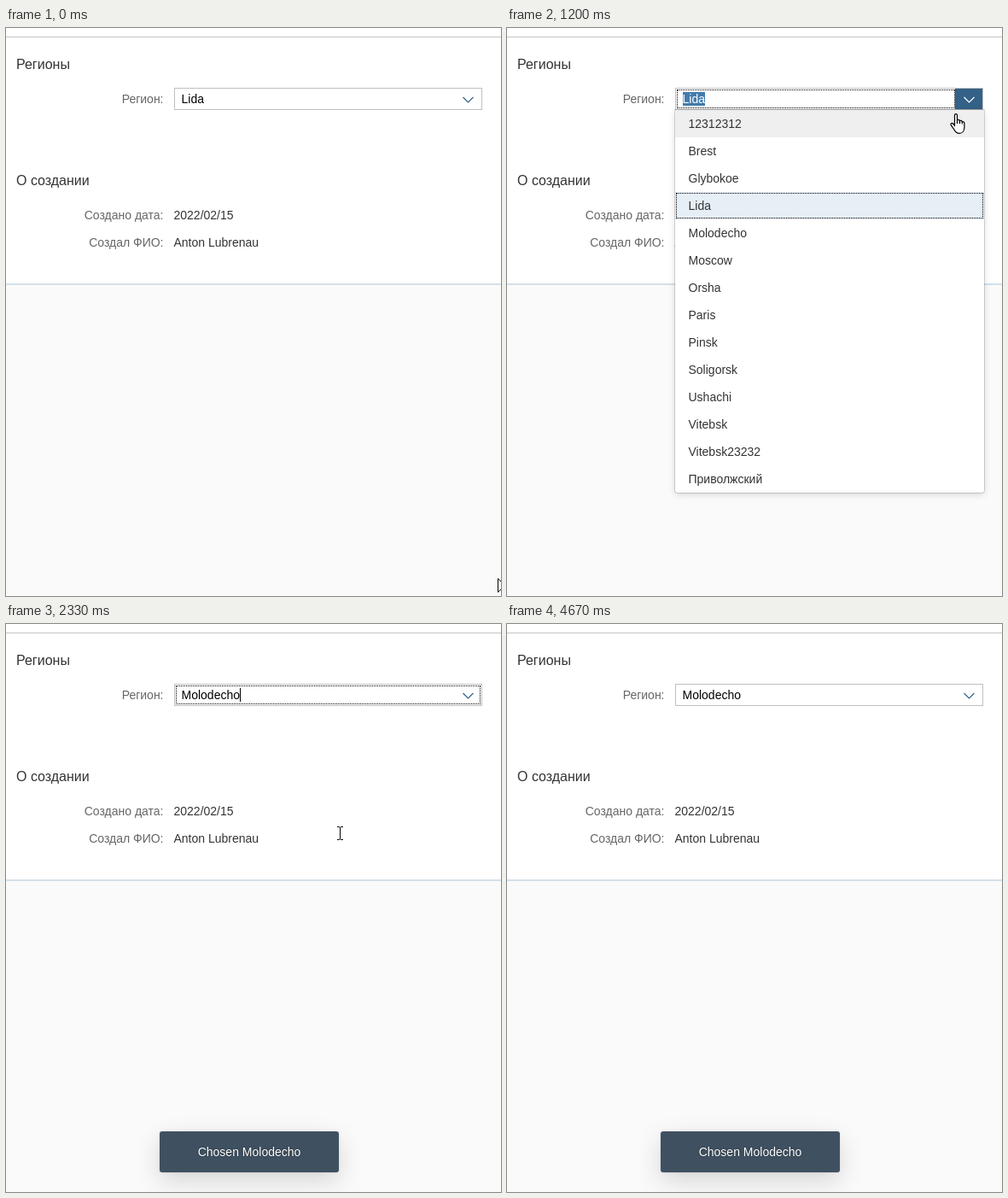
These frames come from a looping animation (580x665 px, 4740 ms). An HTML page:

```html
<!DOCTYPE html>
<html lang="ru">
<head>
<meta charset="utf-8">
<title>Регионы</title>
<style>
html, body { margin: 0; width: 100%; height: 100%; overflow: hidden; }
body { position: relative; background: #fafafa; color: #333; font: 14px/26px "Liberation Sans", Arial, sans-serif; }
div, svg { position: absolute; box-sizing: border-box; white-space: nowrap; }
svg { overflow: visible; }
#panel { left: 0; top: 0; width: 580px; height: 301px; background: #fff; border-bottom: 2px solid #d3e0ea; }
#rule { left: 0; top: 10px; width: 580px; height: 1px; background: #c4c4c4; }
.title { left: 12px; font-size: 16px; line-height: 20px; }
.label { right: 395.5px; color: #666; }
.value { left: 196.5px; }
#field { left: 197px; top: 70px; width: 361px; height: 26px; border: 1px solid #bfbfbf; background: #fff; }
#focus { left: 199px; top: 72px; height: 22px; border: 1px dotted #000; }
#text { left: 205.5px; top: 70px; color: #000; }
#text.marked span { background: #427cac; color: #fff; }
#caret { left: 274px; top: 75px; width: 1px; height: 16px; background: #000; }
#button { left: 525px; top: 71px; width: 32px; height: 24px; }
#chevron { left: 535px; top: 80px; fill: none; stroke-width: 1.2; }
#list { left: 197px; top: 96px; width: 362px; height: 448px; background: #fff; border-radius: 0 0 3px 3px;
  box-shadow: 0 0 0 1px rgba(0,0,0,.15), 0 2px 8px rgba(0,0,0,.15); }
.row { left: 0; width: 362px; height: 32px; padding-left: 15.5px; line-height: 32px; }
.row.hover { background: #efefef; }
.row.current { background: #e6eef6; }
.row.chosen { background: #427cac; color: #fff; text-shadow: 0 0 2px rgba(0,0,0,.5); }
.row.current::after, .row.chosen::after { content: ""; position: absolute; inset: 1px; border: 1px dotted #000; }
#toast { left: 180px; top: 594px; width: 210px; height: 48px; border-radius: 3px; background: #3f5161; color: #fff;
  line-height: 48px; text-align: center; text-shadow: 0 0 2px rgba(0,0,0,.5); box-shadow: 0 10px 30px rgba(0,0,0,.15), 0 0 3px rgba(0,0,0,.1); }
.cursor { left: 0; top: 0; fill: #fff; stroke: #000; stroke-width: 1; }
</style>
</head>
<body>
<div id="panel"></div>
<div id="rule"></div>
<div class="title" style="top:33px">Регионы</div>
<div class="label" style="top:70px">Регион:</div>
<div class="title" style="top:169px">О создании</div>
<div class="label" style="top:206px">Создано дата:</div>
<div class="value" style="top:206px">2022/02/15</div>
<div class="label" style="top:238px">Создал ФИО:</div>
<div class="value" style="top:238px">Anton Lubrenau</div>

<div id="field"></div>
<div id="focus"></div>
<div id="text"><span></span></div>
<div id="caret"></div>
<div id="button"></div>
<svg id="chevron" width="13" height="8"><path d="M.5 1 6.5 7 12.5 1"/></svg>
<div id="list"></div>
<div id="toast">Chosen Molodecho</div>

<svg class="cursor" id="arrow" width="12" height="19"><path d="M.5 .5V16.5L4.2 13 6.9 18.6 9 17.6 6.5 12H11.5Z"/></svg>
<svg class="cursor" id="beam" width="7" height="16" style="fill:none"><path d="M0 .5H3M4 .5H7M3.5 1V15M0 15.5H3M4 15.5H7"/></svg>
<svg class="cursor" id="hand" width="18" height="24" style="stroke-width:1.2">
  <path d="M5.5 2Q5.6 .6 7 .6T8.5 2V8Q10-.2 11.5 8.6 13.5 7.4 14.3 9.6 16.5 9 16.9 11.2V16.5C16.9 20.5 14.5 23.4 11 23.4 7.5 23.4 6.2 21.5 5 19L1.2 13.6C.4 11.6 2.2 10.6 3.6 12L5.5 14.2Z"
    visibility="hidden"/>
  <path d="M5.5 2Q5.6 .6 7 .6T8.5 2V7.8Q10.5 6.9 11.5 8.6 13.5 7.6 14.3 9.6 16.5 9.2 16.9 11.2V16.5C16.9 20.5 14.5 23.4 11 23.4 7.5 23.4 6.2 21.5 5 19L1.2 13.6C.4 11.6 2.2 10.6 3.6 12L5.5 14.2Z"/>
  <path d="M8.5 7.8V12M11.5 8.6V12M14.3 9.6V12.5" fill="none"/>
</svg>

<script>
const LOOP = 4740, TICK = 1000 / 15;
const $ = id => document.getElementById(id);
const names = ["12312312", "Brest", "Glybokoe", "Lida", "Molodecho", "Moscow", "Orsha", "Paris",
  "Pinsk", "Soligorsk", "Ushachi", "Vitebsk", "Vitebsk23232", "Приволжский"];
const LIDA = 3, PICK = 4;

const rows = names.map((name, i) => {
  const row = document.createElement("div");
  row.className = "row";
  row.style.top = i * 32 + "px";
  row.textContent = name;
  return $("list").appendChild(row);
});

// Pointer path: tick, x, y of the hot spot
const path = [
  [0, 576, 644], [1, 560, 600], [3, 505, 430], [5, 470, 270], [6, 463, 200], [8, 490, 102],
  [9, 520, 90], [10, 547, 88], [16, 547, 88], [18, 525, 100], [21, 452, 156], [26, 389, 244],
  [34, 389, 244], [35, 391, 245], [48, 391, 245], [52, 377, 256], [55, 361, 272],
  [57, 335, 305], [60, 210, 450], [63, 35, 638], [65, 39, 656], [71, 39, 700]
];
const offset = { arrow: [0, 0], beam: [-3, -8], hand: [-6, 0] };

function pointer(k) {
  const i = path.findIndex(p => p[0] > k);
  const [k0, x0, y0] = path[i - 1], [k1, x1, y1] = path[i];
  const u = (k - k0) / (k1 - k0);
  return [Math.round(x0 + (x1 - x0) * u), Math.round(y0 + (y1 - y0) * u)];
}

function cursorKind(k) {
  if (k < 9) return "arrow";
  if (k === 9) return "beam";
  if (k < 35) return "hand";
  if (k < 53) return "beam";
  return k < 66 ? "arrow" : "";
}

function listAlpha(k) {
  if (k < 15 || k > 34) return 0;
  if (k < 17) return k === 15 ? .25 : .65;
  return k < 32 ? 1 : [.75, .42, .12][k - 32];
}

const show = (id, on) => { $(id).style.display = on ? "block" : "none"; };

function draw(k) {
  const [x, y] = pointer(k), kind = cursorKind(k);
  const picked = k >= 32, pressed = k >= 14 && !picked;

  for (const id in offset) {
    show(id, id === kind);
    $(id).style.transform = `translate(${x + offset[id][0]}px, ${y + offset[id][1]}px)`;
  }

  $("field").style.borderColor = k >= 9 && k < 18 ? "#427cac" : "#bfbfbf";
  $("button").style.background = pressed ? "#346187" : k >= 10 && k < 14 ? "#eaeaea" : "none";
  $("chevron").style.stroke = pressed ? "#fff" : "#346187";
  show("focus", k >= 14 && k < 70);
  $("focus").style.width = pressed ? "326px" : "357px";
  $("text").firstChild.textContent = names[picked ? PICK : LIDA];
  $("text").className = pressed ? "marked" : "";
  show("caret", picked && k < 70 && !(k >= 40 && k < 48) && !(k >= 56 && k < 64));

  const alpha = listAlpha(k), over = Math.floor((y - 96) / 32);
  show("list", alpha > 0);
  $("list").style.opacity = alpha;
  rows.forEach((row, i) => {
    let state = "";
    if (picked) state = i === PICK ? " chosen" : "";
    else if (i === LIDA) state = " current";
    else if (i === over) state = " hover";
    row.className = "row" + state;
  });
  show("toast", picked);
}

const start = performance.now();
let last = -1;
function frame() {
  const t = (performance.now() - start) % LOOP;
  const k = Math.min(70, Math.floor((t + 4) / TICK));
  if (k !== last) draw(last = k);
  requestAnimationFrame(frame);
}
frame();
</script>
</body>
</html>
```
